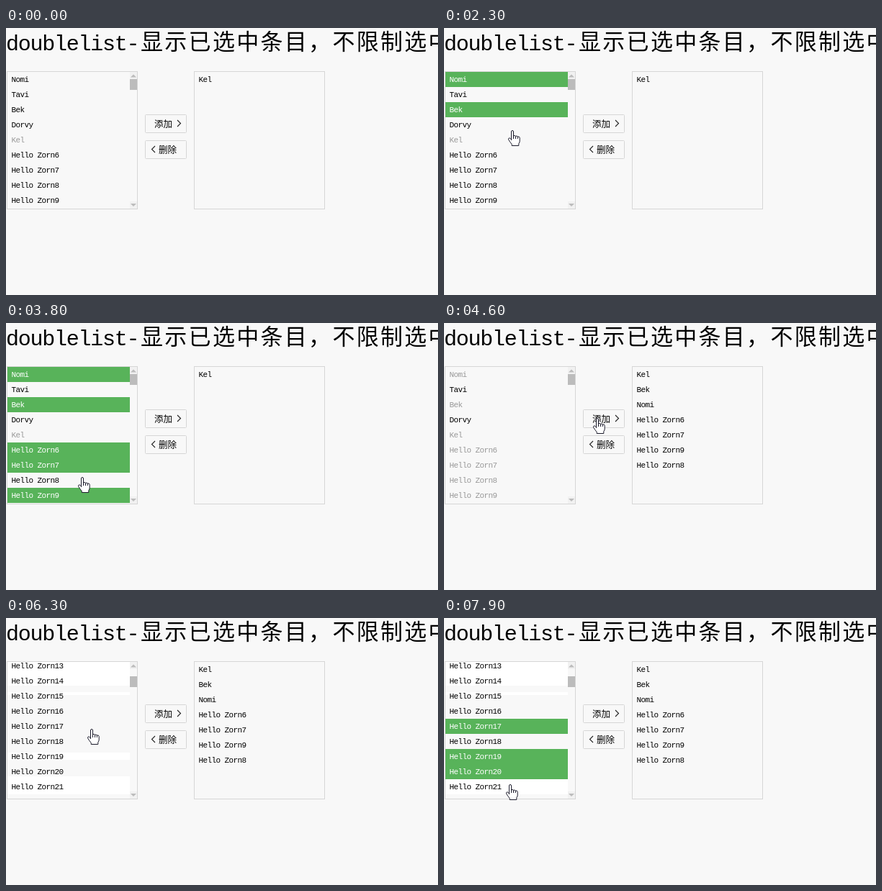
Recreate the animation shown at these times as an HTML page. Size 600 by 371 pixels, loop 8 s.

```html
<!DOCTYPE html>
<html lang="zh">
<head>
<meta charset="utf-8">
<title>doublelist</title>
<style>
  html, body { margin: 0; width: 100%; height: 100%; overflow: hidden; background: #f8f8f8; }
  svg { display: block; }
  .cjk { font-family: "Noto Sans CJK SC", "Noto Sans CJK", sans-serif; }
  .latin { font: 30px "Liberation Mono", monospace; letter-spacing: -1.25px; }
  .item { font: 11px "Liberation Mono", monospace; letter-spacing: -.6px; white-space: pre; }
  .box { fill: #f8f8f8; stroke: #d6d6d6; }
  .line { fill: none; stroke: #222; stroke-width: 1.1; }
  .cursor { fill: #fff; stroke: #1c1c2c; stroke-linejoin: round; }
</style>
</head>
<body>
<svg width="600" height="371" viewBox="0 0 600 371">
  <defs><clipPath id="view"><rect x="2" y="61" width="170" height="190"/></clipPath></defs>
  <text class="latin" x="0" y="31">doublelist-</text>
  <text class="cjk" x="187" y="30" font-size="31" letter-spacing="2.3">显示已选中条目，不限制选中</text>
  <rect class="box" x="1.5" y="60.5" width="181" height="191"/>
  <rect class="box" x="261.5" y="60.5" width="181" height="191"/>
  <g clip-path="url(#view)">
    <path id="strips" d="M2 61h170v33H2zM2 103h170v4H2zM2 187h170v10H2zM2 220h170v25H2z" fill="#fff"/>
    <g id="rows"></g>
  </g>
  <path d="M172 61h10v10h-10zM172 241h10v10h-10z" fill="#f1f1f1"/>
  <path d="M173 68.5l4-4 4 4zM173 244l4 4 4-4z" fill="#bcbcbc"/>
  <rect id="thumb" x="172" width="10" height="15" fill="#bcbcbc"/>
  <g id="chosen"></g>
  <rect class="box" x="193.5" y="120.5" width="57" height="25" rx="1"/>
  <rect class="box" x="193.5" y="156.5" width="57" height="25" rx="1"/>
  <g class="cjk" font-size="12.5">
    <text x="206" y="137.5">添加</text>
    <text x="212" y="173.5">删除</text>
  </g>
  <path class="line" d="M238 128l4.5 4.5-4.5 4.5M207 164l-4.5 4.5 4.5 4.5"/>
  <path id="hand" class="cursor" d="M-1.5 14V2Q-1.5.5 0 .5T1.5 2V8Q3 6.6 4.5 8.3Q6 7.2 7.3 9Q9.6 8.2 10.2 10.5V15Q10.2 17 8.8 18.7V21.5H-.8V19.5Q-3 17-5.3 13.2Q-6 11-4.2 10.8Q-2.8 11-1.5 13M1.5 8V12M4.5 8.3V12M7.3 9V12"/>
  <path id="arrow" class="cursor" d="M.5.5V17L4.2 13.5L6.8 19L9.3 18L7 12.5H12.2Z"/>
</svg>
<script>
const LOOP = 8000, STEP = 100, GLIDE = 200, ROW = 21, TOP = 61;
const $ = id => document.getElementById(id);

function add(parent, tag, attrs, text) {
  const el = document.createElementNS('http://www.w3.org/2000/svg', tag);
  for (const k in attrs) el.setAttribute(k, attrs[k]);
  if (text) el.textContent = text;
  return parent.appendChild(el);
}
const show = (el, on) => el.setAttribute('visibility', on ? 'visible' : 'hidden');
const ramp = (t, a, b) => Math.min(1, Math.max(0, (t - a) / (b - a)));
const inside = (x, y, l, t, r, b) => x >= l && x < r && y >= t && y < b;

const names = ['Nomi', 'Tavi', 'Bek', 'Dorvy', 'Kel'];
while (names.length < 30) names.push('Hello Zorn' + (names.length + 1));

// Pointer stops: arrival, x, y and the time of a click, if any
const stops = [
  [100, 205, 141], [400, 138, 111, 600], [700, 128, 84, 1000], [1100, 130, 82, 1400],
  [1500, 134, 66, 2000], [2300, 95, 142], [2500, 106, 181, 2800], [2900, 103, 202, 3100],
  [3300, 96, 233, 3500], [3800, 106, 214, 4000], [4200, 240, 123, 4500], [4700, 185, 140],
  [5000, 131, 158], [6400, 106, 150, 6500], [6600, 102, 161, 6800], [6900, 100, 172, 7100],
  [7200, 98, 192, 7500], [7600, 96, 214, 7800], [7900, 92, 231]
];

const scrollAt = t => Math.round(51 * ramp(t, 5100, 5700) + 206 * ramp(t, 5800, 6300));
const rowAt = (y, t) => Math.floor((y - TOP + scrollAt(t)) / ROW);

// Glide from stop to stop, leaving each one after its click
function pointerAt(t) {
  let [leave, x, y] = stops[0];
  for (const [arrive, nx, ny, click] of stops) {
    const k = ramp(t, Math.max(leave, arrive - GLIDE), arrive);
    x += (nx - x) * (k || 0);
    y += (ny - y) * (k || 0);
    leave = click || arrive;
  }
  return [Math.round(x), Math.round(y)];
}

// Replay the clicks: a row toggles, the button moves the selection over
function listsAt(t) {
  const picked = new Set(), moved = [4];
  for (const [, x, y, click] of stops) {
    if (!click || click > t) continue;
    const row = rowAt(y, click);
    if (x > 182) {
      moved.push(...picked);
      picked.clear();
    } else if (!picked.delete(row)) picked.add(row);
  }
  return { picked, moved };
}

const rows = names.map((name, i) => {
  const y = TOP + i * ROW;
  return {
    bar: add($('rows'), 'rect', { x: 2, y, width: 170, height: ROW, fill: '#58b35a' }),
    label: add($('rows'), 'text', { class: 'item', x: 7.5, y: y + 14 }, name)
  };
});
const chosen = Array.from({ length: 9 }, (_, i) =>
  add($('chosen'), 'text', { class: 'item', x: 267.5, y: TOP + 14 + i * ROW }));

function draw(time) {
  const t = Math.floor(time / STEP) * STEP;
  const scroll = scrollAt(t), [x, y] = pointerAt(t), { picked, moved } = listsAt(t);

  rows.forEach(({ bar, label }, i) => {
    show(bar, picked.has(i));
    label.setAttribute('fill', picked.has(i) ? '#fff' : moved.includes(i) ? '#999' : '#000');
  });
  chosen.forEach((el, i) => { el.textContent = names[moved[i]] || ''; });
  $('rows').setAttribute('transform', `translate(0 ${-scroll})`);
  $('thumb').setAttribute('y', 71 + Math.round(scroll * .039));
  show($('strips'), scroll > 0);

  const hand = inside(x, y, 2, TOP, 172, 251) && !moved.includes(rowAt(y, t))
    || inside(x, y, 193, 120, 251, 146) || inside(x, y, 193, 156, 251, 182);
  for (const id of ['hand', 'arrow']) {
    show($(id), t >= stops[0][0] && hand === (id === 'hand'));
    $(id).setAttribute('transform', `translate(${x} ${y})`);
  }
}

const start = performance.now();
function tick() {
  draw((performance.now() - start) % LOOP);
  requestAnimationFrame(tick);
}
tick();
</script>
</body>
</html>
```
